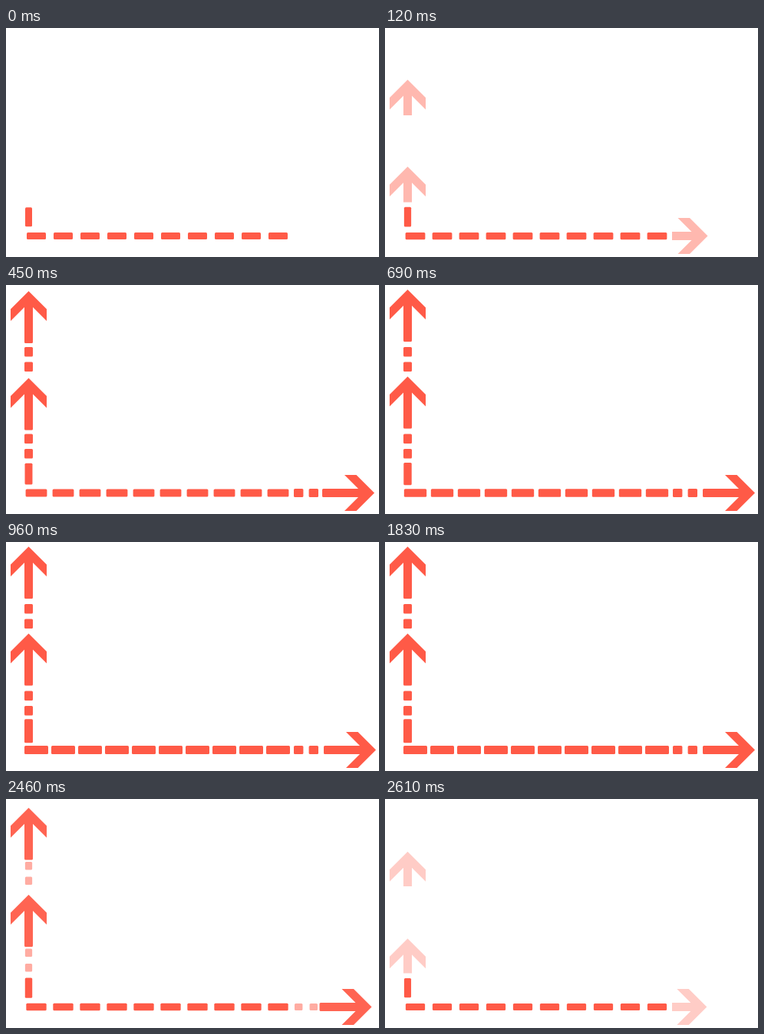
An HTML page for the animation above (2.64 s loop, 486 px wide and 299 px high).

```html
<!DOCTYPE html>
<html lang="en">
<head>
<meta charset="utf-8">
<title>Dashed arrows</title>
<style>
  html, body { margin: 0; width: 100%; height: 100%; overflow: hidden; background: #fff; }
  svg { display: block; width: 100vw; height: 100vh; fill: #ff5a47; }
</style>
</head>
<body>
<svg id="stage" viewBox="0 0 486 299">
  <defs>
    <clipPath id="lane"><rect x="-108" y="-30" width="120" height="60"/></clipPath>
  </defs>
</svg>
<script>
const LOOP = 2640, STEP = 30;
const stage = document.getElementById('stage');

// Each table lists [time, value] pairs joined by straight lines.
const GROW = [[0, 0], [960, 1], [1830, 1], [2640, 0]];
const SLIDE = [[0, -90], [240, -33], [360, 2], [450, -2], [540, 0], [2340, 0]];
const FADE = [[0, 0], [240, 0.86], [360, 1], [2340, 1]];
const DOTS = [[0, 0], [120, 0], [240, 0.4], [390, 1], [2340, 1], [2580, 0]];
const EXIT = 2340, EXIT_SHIFT = -86;

function at(table, t) {
  const i = table.findIndex(p => p[0] > t);
  if (i < 0) return table[table.length - 1][1];
  const [t0, a] = table[i - 1], [t1, b] = table[i];
  return a + (b - a) * (t - t0) / (t1 - t0);
}

function add(parent, tag, attrs = {}) {
  const el = document.createElementNS('http://www.w3.org/2000/svg', tag);
  for (const k in attrs) el.setAttribute(k, attrs[k]);
  return parent.appendChild(el);
}

function sizeBox(el, cx, cy, w, h) {
  el.setAttribute('x', cx - w / 2);
  el.setAttribute('y', cy - h / 2);
  el.setAttribute('width', w);
  el.setAttribute('height', h);
}

// Arrows are drawn pointing right with the tip at the local zero point.
const HEAD = 'M0 0L-23.5 23.5H-39L-21 5.5H-66.5Q-68 5.5-68 4V-4Q-68-5.5-66.5-5.5H-21L-39-23.5H-23.5Z';
const arrows = [[482, 271.5, 0], [29.5, 6, -90], [29.5, 119.5, -90]].map(([x, y, turn]) => {
  const g = add(stage, 'g', {
    transform: `translate(${x} ${y}) rotate(${turn})`, 'clip-path': 'url(#lane)'
  });
  const dots = [-81.2, -100.8].map(cx => ({ cx, el: add(g, 'rect', { rx: 1.5 }) }));
  return { dots, head: add(g, 'path', { d: HEAD }) };
});

const dashes = Array.from({ length: 10 }, (_, i) => add(stage, 'rect', { rx: 1.5 }));
const stem = add(stage, 'rect', { rx: 1.5 });

function draw(t) {
  const grow = at(GROW, t);
  const long = 25 + 6 * grow, thick = 9 + 2 * grow;
  dashes.forEach((el, i) => sizeBox(el, 39.5 + 35 * i, 271.5, long, thick));
  sizeBox(stem, 29.5, 246.7, thick, long);

  const out = Math.max(0, (t - EXIT) / (LOOP - EXIT)) ** 3;
  const shift = at(SLIDE, t) + EXIT_SHIFT * out;
  const alpha = at(FADE, t) * (1 - out * 0.95);
  const dot = at(DOTS, t), size = 0.68 + 0.32 * dot;
  for (const { head, dots } of arrows) {
    head.setAttribute('transform', `translate(${shift} 0)`);
    head.setAttribute('opacity', alpha);
    for (const { cx, el } of dots) {
      sizeBox(el, cx, 0, 12.4 * size, 11 * size);
      el.setAttribute('opacity', dot);
    }
  }
}

const start = performance.now();
function tick() {
  const t = (performance.now() - start) % LOOP;
  draw(Math.floor(t / STEP) * STEP);
  requestAnimationFrame(tick);
}
tick();
</script>
</body>
</html>
```
